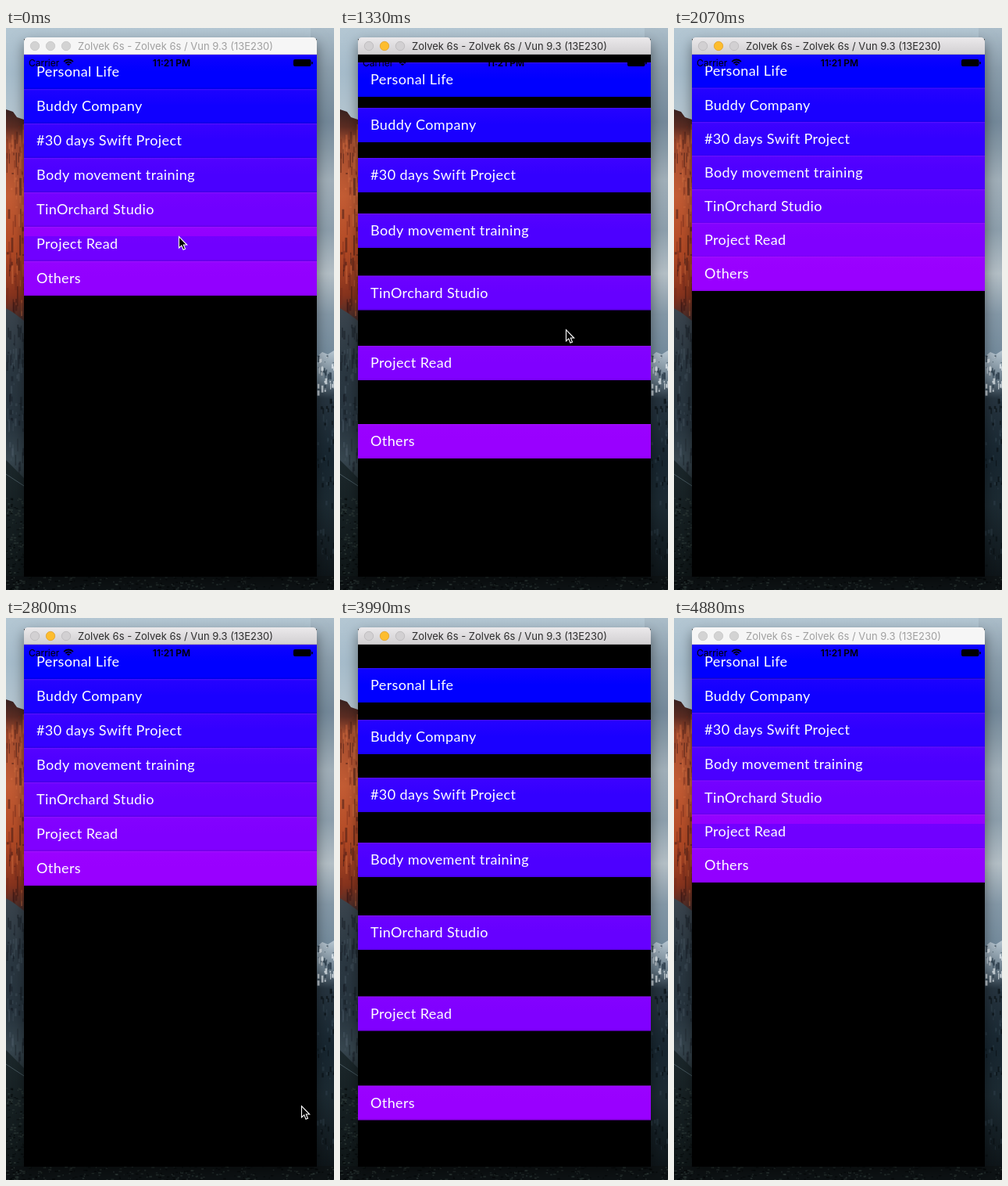
Animation of 420 by 718 pixels, one loop 4980 ms. Source, as an HTML page with a canvas:

```html
<!DOCTYPE html>
<html lang="en">
<head>
<meta charset="utf-8">
<title>Animated list</title>
<style>
html, body { margin: 0; width: 100%; height: 100%; overflow: hidden; background: #000; }
canvas { display: block; width: 420px; height: 718px; }
</style>
</head>
<body>
<canvas id="stage" width="420" height="718"></canvas>
<script>
const W = 420, H = 718, LOOP = 4980, STEP = 147.88;
const ctx = document.getElementById('stage').getContext('2d');

const SCREEN = { x: 23, y: 34, w: 375, h: 667 };
const ROW_H = 44;
const ROWS = ['Personal Life', 'Buddy Company', '#30 days Swift Project',
  'Body movement training', 'TinOrchard Studio', 'Project Read', 'Others'];
const TITLE = 'Zolvek 6s - Zolvek 6s / Vun 9.3 (13E230)';

// Steps at which the app restarts, and the start of each run in ms
const FIRST = { step: 5, start: 691 }, SECOND = { step: 23, start: 3420 };
const BLUR_STEP = 33;

// Cursor tip by step; it is off the stage at other steps
const POINTER = {
  0: [221, 266], 1: [217, 262], 2: [213, 256], 3: [215, 253], 4: [215, 253],
  5: [215, 253], 6: [215, 253], 7: [221, 264], 8: [247, 311], 9: [289, 385],
  10: [371, 575], 19: [378, 623], 20: [387, 652]
};

function seeded(seed) {
  return () => (seed = (seed * 16807) % 2147483647) / 2147483647;
}

function vertical(c, y0, y1, stops) {
  const g = c.createLinearGradient(0, y0, 0, y1);
  stops.forEach(([at, color]) => g.addColorStop(at, color));
  return g;
}

function polygon(c, points, fill) {
  c.beginPath();
  points.forEach(([x, y]) => c.lineTo(x, y));
  c.closePath();
  c.fillStyle = fill;
  c.fill();
}

function streaks(c, rand, count, box, colors, length) {
  const [x, y, w, h] = box;
  for (let i = 0; i < count; i++) {
    c.fillStyle = colors[Math.floor(rand() * colors.length)];
    c.fillRect(x + rand() * w, y + rand() * h, 1 + rand() * 2, 1 + rand() * length);
  }
}

function paintWallpaper() {
  const layer = document.createElement('canvas');
  layer.width = W;
  layer.height = H;
  const c = layer.getContext('2d');
  const rand = seeded(41);

  c.fillStyle = vertical(c, 0, H, [[0, '#b4c7d3'], [.08, '#a6bccb'], [.16, '#b5c6d0'], [1, '#8fa3b0']]);
  c.fillRect(0, 0, W, H);
  c.fillStyle = vertical(c, 0, 430, [[0, '#abbdc9'], [.12, '#8b9eac'], [.28, '#74899a'],
    [.36, '#8799a6'], [.45, '#a1afb9'], [.6, '#8d9fac'], [.73, '#b4bfc6'], [.85, '#8498a7'], [1, '#6f8799']]);
  c.fillRect(390, 0, 30, 430);

  // Left cliff
  polygon(c, [[0, 104], [9, 107], [14, 114], [23, 117], [30, 380], [0, 380]],
    vertical(c, 104, 380, [[0, '#38211f'], [.08, '#5b2c22'], [.16, '#a74e2f'], [.4, '#c35c34'],
      [.65, '#b44a25'], [.86, '#87331d'], [1, '#352a2d']]));
  streaks(c, rand, 85, [0, 120, 23, 235],
    ['rgba(55,20,18,.5)', 'rgba(225,120,70,.4)', 'rgba(120,45,28,.5)'], 25);
  polygon(c, [[0, 358], [10, 364], [23, 374], [23, 600], [0, 600]],
    vertical(c, 358, 600, [[0, '#3b454e'], [.3, '#2b3842'], [.6, '#26333d'], [.8, '#37464f'], [1, '#1b2529']]));
  streaks(c, rand, 70, [0, 375, 23, 190], ['rgba(15,22,28,.4)', 'rgba(85,100,112,.3)'], 18);
  polygon(c, [[0, 552], [23, 575], [23, 718], [0, 718]],
    vertical(c, 550, 718, [[0, '#1c282c'], [1, '#0d1415']]));
  c.strokeStyle = '#46565d';
  c.beginPath();
  c.moveTo(0, 570);
  c.lineTo(23, 585);
  c.stroke();

  // Right mountain
  polygon(c, [[398, 420], [405, 414], [412, 417], [420, 412], [420, 718], [398, 718]],
    vertical(c, 412, 718, [[0, '#b8c7d2'], [.12, '#6b7e8c'], [.2, '#26343f'], [.45, '#172630'],
      [.65, '#1c2a32'], [1, '#0b1114']]));
  streaks(c, rand, 40, [398, 418, 22, 50], ['rgba(235,242,247,.7)', 'rgba(45,62,76,.7)'], 8);
  streaks(c, rand, 60, [398, 470, 22, 240], ['rgba(8,14,18,.6)', 'rgba(65,85,98,.3)'], 8);

  // Forest floor
  c.fillStyle = '#0d1214';
  c.fillRect(0, 700, W, 18);
  for (let i = 0; i < 380; i++) {
    const left = i % 3 === 0;
    c.fillStyle = rand() < .5 ? 'rgba(58,72,68,.5)' : 'rgba(2,5,6,.6)';
    c.fillRect(left ? rand() * 23 : rand() * W, left ? 600 + rand() * 118 : 700 + rand() * 18,
      1 + rand() * 3, 1 + rand());
  }

  // Window shadow
  c.shadowColor = 'rgba(0,0,0,.45)';
  c.shadowBlur = 16;
  c.shadowOffsetY = 5;
  c.fillStyle = '#000';
  c.fillRect(23, 14, 375, 687);
  return layer;
}

function drawTitleBar(active) {
  ctx.beginPath();
  ctx.roundRect(23, 12, 375, 22, [5, 5, 0, 0]);
  ctx.fillStyle = active
    ? vertical(ctx, 12, 34, [[0, '#ebe9eb'], [1, '#d1cfd1']])
    : '#f6f6f6';
  ctx.fill();
  ctx.fillStyle = active ? '#b3b1b3' : '#d8d8d8';
  ctx.fillRect(23, 33, 375, 1);

  [37, 57, 77].forEach((x, i) => {
    const lit = active && i === 1;
    ctx.beginPath();
    ctx.arc(x, 23, 5.7, 0, Math.PI * 2);
    ctx.fillStyle = lit ? '#fdbd2e' : active ? '#d2d0d2' : '#d3d3d3';
    ctx.fill();
    ctx.lineWidth = .8;
    ctx.strokeStyle = lit ? '#e0a02a' : active ? '#bab8ba' : '#c6c6c6';
    ctx.stroke();
  });

  ctx.font = '13px Inter, sans-serif';
  ctx.textBaseline = 'alphabetic';
  ctx.textAlign = 'left';
  ctx.fillStyle = active ? '#2d2d2d' : '#a0a0a0';
  ctx.fillText(TITLE, 92, 28);
}

// Damped spring from 1 to 0, damping ratio 0.8
function spring(ms) {
  const u = Math.max(0, ms) * .006;
  return Math.exp(-.8 * u) * (Math.cos(.6 * u) + 4 / 3 * Math.sin(.6 * u));
}

function drawRow(i, y, active) {
  const { x, w } = SCREEN;
  const red = active ? Math.round(i * 25.5) : [0, 16, 46, 74, 112, 112, 146][i];
  ctx.fillStyle = `rgb(${red},0,255)`;
  ctx.fillRect(x, y, w, ROW_H);
  if (!active && i === 5) {
    ctx.fillStyle = '#9200ff';
    ctx.fillRect(x, y, w, 12);
  }
  ctx.fillStyle = vertical(ctx, y, y + ROW_H, [[0, 'rgba(190,60,255,.32)'], [.045, 'rgba(170,30,255,.08)'],
    [.5, 'rgba(160,0,255,0)'], [.94, 'rgba(0,0,0,0)'], [1, 'rgba(0,0,40,.12)']]);
  ctx.fillRect(x, y, w, ROW_H);

  ctx.font = '18px Lato, sans-serif';
  ctx.letterSpacing = '0.4px';
  ctx.textAlign = 'left';
  ctx.fillStyle = '#fff';
  ctx.fillText(ROWS[i], x + 16, y + 28);
  ctx.letterSpacing = '0px';
}

function drawStatusBar() {
  ctx.fillStyle = ctx.strokeStyle = '#000';
  ctx.font = '12px Inter, sans-serif';
  ctx.textAlign = 'left';
  ctx.fillText('Carrier', 29, 48.5);
  ctx.font = '600 12px Inter, sans-serif';
  ctx.textAlign = 'center';
  ctx.fillText('11:21 PM', 212, 48.5);

  ctx.lineWidth = 1.8;
  [8, 5, 2].forEach(r => {
    ctx.beginPath();
    ctx.arc(80, 48.5, r, -Math.PI * .76, -Math.PI * .24);
    ctx.stroke();
  });

  ctx.beginPath();
  ctx.roundRect(368, 40, 22.5, 9, 2);
  ctx.roundRect(391.2, 43, 1.6, 3.4, .8);
  ctx.fill();
}

function drawPointer([x, y]) {
  ctx.save();
  ctx.translate(x + .5, y + .5);
  ctx.lineWidth = 1.1;
  ctx.strokeStyle = '#fff';
  polygon(ctx, [[0, 0], [0, 14.5], [3.3, 11.4], [5.5, 16.8], [8, 15.8], [5.8, 10.5], [10.2, 10.5]], '#000');
  ctx.stroke();
  ctx.restore();
}

const wallpaper = paintWallpaper();

function render(ms) {
  const step = Math.floor((ms + 10) / STEP);
  const clock = step * STEP;
  const active = step >= FIRST.step && step < BLUR_STEP;
  const settled = step < FIRST.step;
  const run = step < SECOND.step ? FIRST : SECOND;

  ctx.drawImage(wallpaper, 0, 0);
  drawTitleBar(active);

  ctx.save();
  ctx.beginPath();
  ctx.rect(SCREEN.x, SCREEN.y, SCREEN.w, SCREEN.h);
  ctx.clip();
  ctx.fillStyle = '#000';
  ctx.fillRect(SCREEN.x, SCREEN.y, SCREEN.w, SCREEN.h);
  ROWS.forEach((_, i) => {
    const age = clock - run.start - i * 50;
    if (!settled && age < 50) return;
    const offset = settled ? 0 : SCREEN.h * spring(age);
    drawRow(i, SCREEN.y + i * ROW_H + Math.round(offset * 2) / 2, active);
  });
  drawStatusBar();
  ctx.restore();

  if (POINTER[step]) drawPointer(POINTER[step]);
}

const began = performance.now();
function tick() {
  render((performance.now() - began) % LOOP);
  requestAnimationFrame(tick);
}
tick();
</script>
</body>
</html>
```
